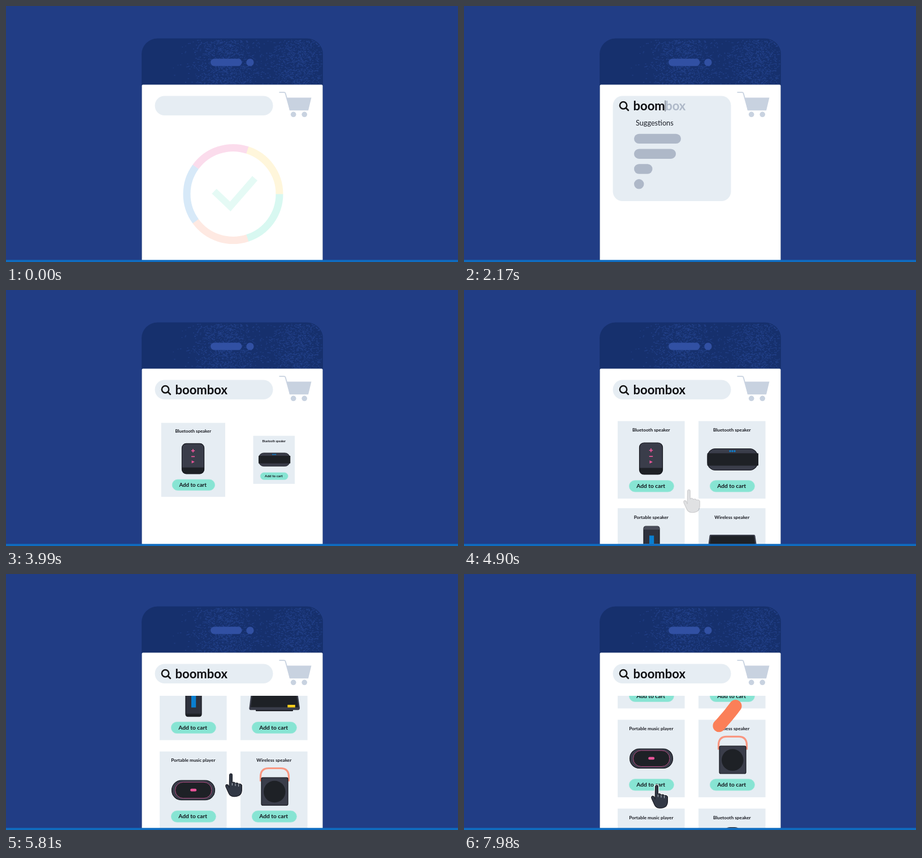
These frames come from a looping animation (800 px wide and 454 px high, 8000 ms). An HTML page with a canvas:

```html
<!DOCTYPE html>
<html lang="en">
<head>
<meta charset="utf-8">
<title>Shopping search</title>
<style>
  html, body { margin: 0; height: 100%; overflow: hidden; background: #213d85; }
  canvas { display: block; width: 100vw; height: 100vh; }
</style>
</head>
<body>
<canvas id="stage" width="800" height="454"></canvas>
<script>
const ctx = document.getElementById('stage').getContext('2d');
const LOOP = 8000, STEP = 70;
const DARK = '#3a3d4a', BLACK = '#1e2126', EDGE = '#14161d', PINK = '#ea5599', BLUE = '#0a7fd0', MINT = '#87e4d3';
const PANEL = '#e6edf3', ORANGE = '#fb7f58';

const clamp = v => Math.max(0, Math.min(1, v));
const progress = (t, start, end) => clamp((t - start) / (end - start));
const smooth = u => u * u * (3 - 2 * u);
const cubicOut = u => 1 - (1 - u) ** 3;
const backIn = u => u * u * (2.9 * u - 1.9);
const backOut = u => 1 - backIn(1 - u);

function box(x, y, w, h, r, fill, stroke, lineWidth = 1.2) {
  ctx.beginPath();
  ctx.roundRect(x, y, w, h, r);
  if (fill) { ctx.fillStyle = fill; ctx.fill(); }
  if (stroke) { ctx.strokeStyle = stroke; ctx.lineWidth = lineWidth; ctx.stroke(); }
}
function disc(x, y, r, fill) {
  ctx.beginPath();
  ctx.arc(x, y, r, 0, 7);
  ctx.fillStyle = fill;
  ctx.fill();
}
function shape(path, fill) {
  ctx.fillStyle = fill;
  ctx.fill(new Path2D(path));
}
function line(path, color, width, cap = 'butt') {
  ctx.strokeStyle = color;
  ctx.lineWidth = width;
  ctx.lineCap = cap;
  ctx.lineJoin = cap === 'round' ? 'round' : 'miter';
  ctx.stroke(new Path2D(path));
}
function text(str, x, y, size, color, weight = 700, align = 'left') {
  ctx.font = `${weight} ${size}px Lato, sans-serif`;
  ctx.textAlign = align;
  ctx.fillStyle = color;
  ctx.fillText(str, x, y);
}
function layer(draw) {
  ctx.save();
  draw();
  ctx.restore();
}

// Grain on the top of the phone, thicker in two bands
const grain = new Path2D();
let seed = 7;
const random = () => (seed = seed * 16807 % 2147483647) / 2147483647;
for (let i = 0; i < 6500; i++) {
  const x = 244 + random() * 314, y = 60 + random() * 78;
  const band = Math.exp(-(((x - 388) / 42) ** 2)) + Math.exp(-(((x - 516) / 36) ** 2));
  if (random() < band * 0.7) grain.rect(x, y, 1.2 + random() * 1.6, 1.2);
}

function drawPhone() {
  ctx.fillStyle = '#213d85';
  ctx.fillRect(0, 0, 800, 454);
  box(240, 57.5, 321, 420, 28, '#16306d');
  ctx.fillStyle = '#213f87';
  ctx.fill(grain);
  box(362, 93.5, 55.5, 13, 6.5, '#3150a3');
  disc(432, 100, 6.6, '#3150a3');
  box(240.5, 139.5, 320, 320, 2, '#fff');
}

function drawCart() {
  const color = '#c8d2e0';
  line('M483.5 153.2H492Q494 153.2 494.6 155L503 185', color, 1.8);
  shape('M497 162.5H540.5L535 185.3H502Z', color);
  disc(508.7, 192.3, 4.8, color);
  disc(528.2, 192.3, 4.8, color);
}

function drawRing(t) {
  const fade = 1 - progress(t, 0, 210);
  if (!fade) return;
  const colors = ['#3fd9b8', '#fb8f70', '#3a8fdc', '#e84f9f', '#ffd24a'];
  layer(() => {
    ctx.globalAlpha = 0.2 * fade;
    ctx.lineWidth = 13;
    colors.forEach((color, i) => {
      ctx.beginPath();
      ctx.arc(402, 333.5, 82, i * Math.PI * 0.4, (i + 1) * Math.PI * 0.4);
      ctx.strokeStyle = color;
      ctx.stroke();
    });
    ctx.globalAlpha = 0.12 * fade;
    line('M368.5 328.5L397 355.5L440.5 305.5', '#2fd0ae', 12);
  });
}

function drawSearch(t) {
  const open = t < 2590 ? backOut(progress(t, 1610, 2030)) : 1 - backIn(progress(t, 2590, 3010));
  const height = 34.5 + 152 * open;
  box(263.5, 159.5, 209, height, 17, PANEL);

  layer(() => {
    ctx.globalAlpha = progress(t, 940, 1150);
    ctx.beginPath();
    ctx.arc(282, 176.2, 6.2, 0, 7);
    ctx.strokeStyle = '#111';
    ctx.lineWidth = 2.5;
    ctx.stroke();
    line('M286.7 180.9L290.8 185', '#111', 2.7, 'round');
  });

  const word = 'boombox';
  const typed = t < 1260 ? 0 : t < 2450 ? Math.min(4, 1 + Math.floor((t - 1260) / 210)) : 7;
  const shown = word.slice(0, typed);
  text(shown, 299.6, 185, 22, '#0b0b0f');
  const cursorX = 300 + ctx.measureText(shown).width;
  if (typed === 4) text(word.slice(4), cursorX, 185, 22, '#aeb8c8');
  if (t >= 1120 && t < 2520) {
    ctx.fillStyle = '#5c626e';
    ctx.fillRect(cursorX - 0.7, 167.5, 1.2, 19.5);
  }

  if (open <= 0.05) return;
  layer(() => {
    ctx.beginPath();
    ctx.rect(264, 194, 208, height - 40);
    ctx.clip();
    text('Suggestions', 304, 212, 12.7, '#1a1d26', 400);
    [83, 74, 32.5, 17.5].forEach((w, i) => box(301, 226.7 + i * 26.8, w, 17.4, 8.7, '#aeb8c8'));
  });
}

// Products are drawn relative to the top left corner of their card
const products = [
  ['Bluetooth speaker', () => {
    box(38.5, 38.5, 41, 56, 8, DARK);
    box(38.5, 83, 41, 11.5, [0, 0, 8, 8], BLACK);
    box(38.5, 38.5, 41, 56, 8, null, EDGE);
    line('M55.8 51.8H62.2M59 48.6V55M55.8 62.7H62.2', PINK, 1.8);
    shape('M56.5 69.7L62 72.5L56.5 75.3Z', PINK);
  }],
  ['Bluetooth speaker', () => {
    box(16, 49, 88.5, 38, 14, DARK, EDGE);
    box(15.5, 57, 90.5, 22, 1, BLACK);
    [56, 60, 64].forEach(x => disc(x, 53.3, 1.7, BLUE));
  }],
  ['Portable speaker', () => {
    box(46, 32, 28, 63.5, 4, '#2f323d', EDGE);
    box(46, 32, 28, 6, [4, 4, 0, 0], '#4a4d5a');
    box(46, 90.5, 28, 5, [0, 0, 4, 4], BLACK);
    ctx.fillStyle = BLUE;
    ctx.fillRect(56, 48.5, 8.2, 31);
  }],
  ['Wireless speaker', () => {
    box(27, 82, 66, 4, 1, EDGE);
    shape('M21 47H98Q100 47 100.4 49L105 80Q105 84 102 84H18Q15 84 15.5 80L19.5 49Q20 47 21 47Z', DARK);
    shape('M22 49H98L102.5 79H18Z', BLACK);
    ctx.fillStyle = '#f8cf1c';
    ctx.fillRect(83.3, 74.8, 13.5, 4.6);
  }],
  ['Portable music player', () => {
    box(21.5, 51.5, 76, 34.5, 17, DARK, EDGE);
    box(27.5, 54.5, 64.5, 28.5, 14, BLACK, '#b24a80', 1);
    box(54.2, 66, 11, 4.7, 2.2, PINK);
  }],
  ['Wireless speaker', () => {
    line('M35.5 53V45Q35.5 29.8 50 29.8H71Q85.5 29.8 85.5 45V53', '#f99680', 3.2);
    box(37, 46.5, 47, 49, 2.5, DARK, EDGE);
    disc(60.3, 71.3, 19.3, BLACK);
  }],
  ['Portable music player', () => box(21.5, 51.5, 76, 34.5, 17, DARK, EDGE)],
  ['Bluetooth speaker', () => box(43, 33.5, 34, 62, 13, DARK, EDGE)],
];
const rowOffsets = [0, 154.5, 312, 469.5];

function drawCards(t) {
  const eased = 1 - (1 - smooth(progress(t, 4940, 6650))) ** 2.26;
  const scroll = 286 * eased;
  layer(() => {
    ctx.beginPath();
    ctx.rect(241, 216, 319, 234.5);
    ctx.clip();
    products.forEach(([title, drawProduct], i) => {
      const start = 3668 + 184 * Math.min(i, 3);
      const scale = cubicOut(progress(t, start, start + 500));
      const y = 232.5 + rowOffsets[i >> 1] - scroll;
      if (!scale || y > 452 || y < 70) return;
      layer(() => {
        ctx.translate(i % 2 ? 474.3 : 331.3, y + 68.7);
        ctx.scale(scale, scale);
        ctx.translate(-59.3, -68.7);
        ctx.fillStyle = PANEL;
        ctx.fillRect(0, 0, 118.6, 137.4);
        text(title, 59.3, 18.7, 8.2, '#14161d', 700, 'center');
        drawProduct();
        box(20.4, 105.2, 79, 20.2, 10.1, MINT, '#98e6d9', 0.8);
        text('Add to cart', 58.6, 118.6, 10.2, '#10131a', 700, 'center');
      });
    });
  });
}

// The orange streak runs along a curve from the button to the cart
function drawStreak(t) {
  if (t < 7770) return;
  const start = [331, 373], bend = [472, 272], end = [514, 178];
  const point = u => [0, 1].map(k => (1 - u) ** 2 * start[k] + 2 * u * (1 - u) * bend[k] + u * u * end[k]);
  const tail = 0.02 + 0.8 * smooth(progress(t, 7760, 8135));
  const head = Math.max(tail, 0.84 * smooth(progress(t, 7760, 8055)));
  const points = Array.from({ length: 16 }, (_, i) => point(tail + (head - tail) * i / 15));
  line('M' + points.map(p => p.join(' ')).join('L'), ORANGE, 22, 'round');
}

const hand = new Path2D('M-2.4 2.6a2.4 2.4 0 0 1 4.8 0V16.5q3.4-3 5.6 1q3.4-2.4 5.6 1q3.8-1.6 5.8 2V28q0 12.6-12.6 12.6h-2q-6 0-8.6-5.8l-5-11q-1.3-3.6 1.3-4.5q3 0 3.6 3l1.1 2.6z');
function drawHand(t) {
  const alpha = progress(t, 4870, 5070);
  if (!alpha) return;
  const move = smooth(progress(t, 6930, 7560));
  layer(() => {
    ctx.globalAlpha = alpha;
    ctx.translate(398 - 57 * move, 354 + 20.5 * move);
    ctx.lineJoin = 'round';
    if (alpha === 1) {
      ctx.strokeStyle = '#fff';
      ctx.lineWidth = 3.4;
      ctx.stroke(hand);
    }
    ctx.fillStyle = '#323845';
    ctx.fill(hand);
    ctx.strokeStyle = '#1b1e27';
    ctx.lineWidth = 1.2;
    ctx.stroke(hand);
    line('M2.4 16.5V21M8 17.5V22M13.6 18.5V23', '#e6edf3', 0.8);
  });
}

function frame(now) {
  const t = Math.floor(now % LOOP / STEP) * STEP;
  drawPhone();
  drawCart();
  drawRing(t);
  drawCards(t);
  drawSearch(t);
  drawStreak(t);
  drawHand(t);
  ctx.fillStyle = '#0f6cc0';
  ctx.fillRect(0, 450.3, 800, 4);
  requestAnimationFrame(frame);
}
requestAnimationFrame(frame);
</script>
</body>
</html>
```
